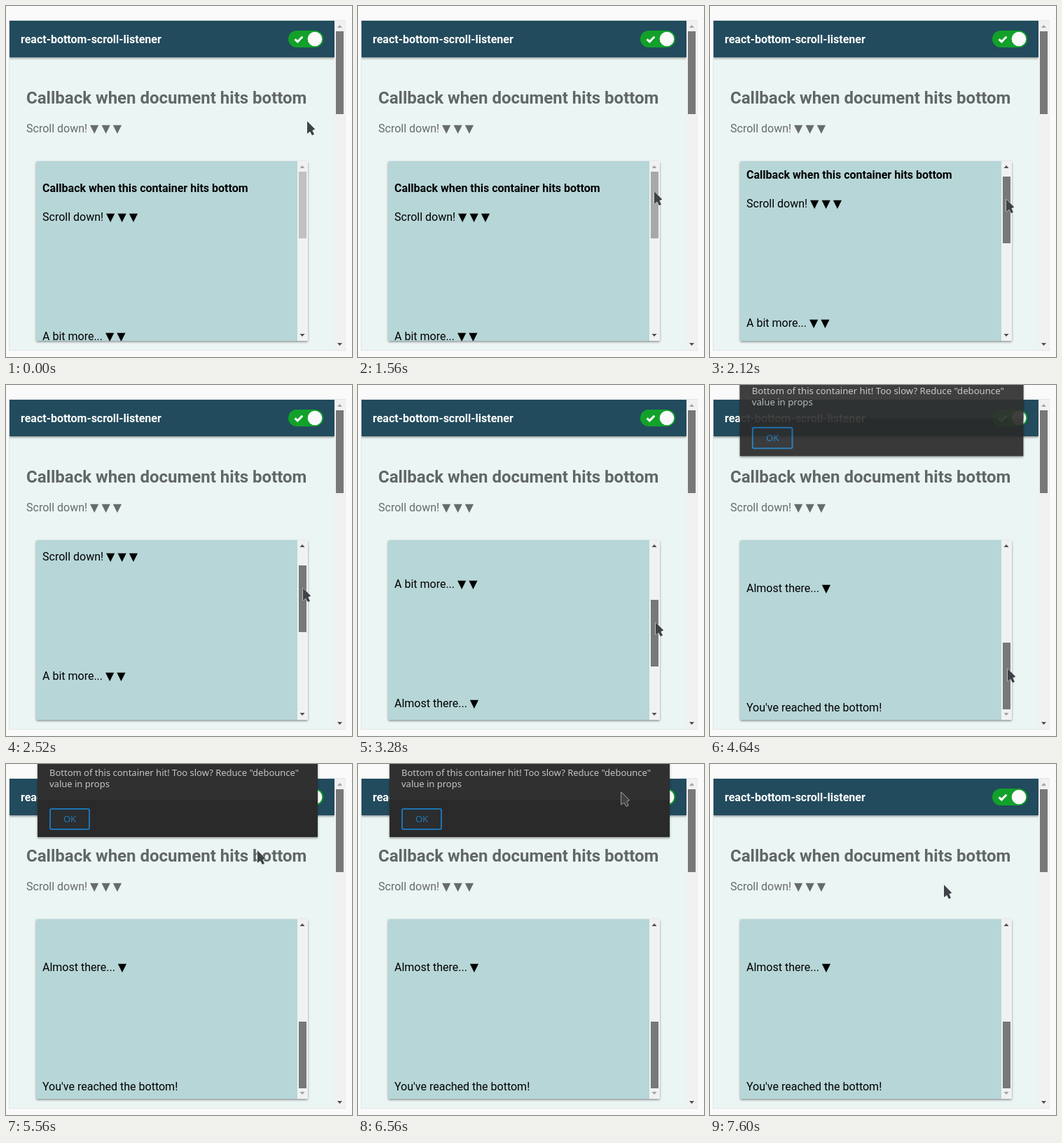
An HTML page that plays this animation: 494 px wide and 500 px high, repeating every 7.64 s.

```html
<!DOCTYPE html>
<html lang="en">
<head>
<meta charset="utf-8">
<title>react-bottom-scroll-listener</title>
<style>
html, body { margin: 0; width: 100%; height: 100%; overflow: hidden; background: #fafafa; }
svg { display: block; width: 494px; height: 500px; }
text { font: 16px Roboto, "DejaVu Sans", sans-serif; white-space: pre; }
.bold { font-weight: 700; }
.title { font-size: 24px; }
.msg { font: 13px "Noto Sans", sans-serif; fill: #c4c4c4; }
</style>
</head>
<body>
<svg viewBox="0 0 494 500" xmlns="http://www.w3.org/2000/svg">
  <defs>
    <filter id="soft" x="-10%" y="-20%" width="120%" height="150%">
      <feDropShadow dx="0" dy="1.5" stdDeviation="1.8" flood-color="#000" flood-opacity=".42"/>
    </filter>
    <clipPath id="view"><rect x="43" y="221" width="373" height="256" rx="2"/></clipPath>
    <clipPath id="app"><rect x="5" y="21" width="464" height="469"/></clipPath>
  </defs>

  <rect width="494" height="500" fill="#fafafa"/>
  <rect x="4.5" y="20.5" width="480" height="470" fill="#ebf5f3" stroke="#dfe7e8"/>

  <g clip-path="url(#app)">
    <rect x="5" y="21" width="464" height="52" fill="#214c5d" filter="url(#soft)"/>
    <text class="bold" x="21" y="53" fill="#fff">react-bottom-scroll-listener</text>
    <rect x="403" y="35" width="50" height="24" rx="12" fill="#12a12a"/>
    <circle cx="441" cy="47" r="10.3" fill="#fafafa"/>
    <path d="M412.5 47.3l3.8 3.6 7-7.2" fill="none" stroke="#fff" stroke-width="3"/>
    <text class="bold title" x="29" y="139" fill="#616667">Callback when document hits bottom</text>
    <text x="29" y="180" fill="#676b6b">Scroll down! ▼ ▼ ▼</text>
  </g>

  <rect x="469" y="21" width="15.5" height="469" fill="#f1f1f1"/>
  <rect x="471" y="36" width="11" height="118" fill="#787878"/>
  <path d="M473 31h7l-3.5-4z" fill="#a3a3a3"/>
  <path d="M473 480h7l-3.5 4z" fill="#505050"/>

  <rect x="43" y="221" width="388" height="256" rx="2" fill="#b7d6d8" filter="url(#soft)"/>
  <g clip-path="url(#view)">
    <g id="list">
      <text class="bold" x="52" y="265">Callback when this container hits bottom</text>
      <text x="52" y="306">Scroll down! ▼ ▼ ▼</text>
      <text x="52" y="476">A bit more... ▼ ▼</text>
      <text x="52" y="646">Almost there... ▼</text>
      <text x="52" y="816">You've reached the bottom!</text>
    </g>
  </g>
  <rect x="416" y="221" width="15" height="256" fill="#f1f1f1"/>
  <rect id="thumb" x="418" y="236" width="11" height="95"/>
  <path id="up" d="M419.5 231h7l-3.5-4z"/>
  <path id="down" d="M419.5 467h7l-3.5 4z"/>

  <g id="dialog">
    <rect x="45" y="-60" width="400" height="164" fill="#2b2b2b" filter="url(#soft)"/>
    <rect x="45" y="-60" width="400" height="111" fill="#303030"/>
    <text class="msg" x="62" y="17">Bottom of this container hit! Too slow? Reduce "debounce"</text>
    <text class="msg" x="62" y="33">value in props</text>
    <rect x="63" y="64" width="56" height="29" rx="2" fill="#2b2d2f" stroke="#1d74b2" stroke-width="2"/>
    <text class="msg" x="91" y="83" text-anchor="middle" style="fill:#2478b3">OK</text>
  </g>

  <path id="cursor" d="M0 0V18L4 14.7 7 20.3 10 18.8 7.4 13.2 11.3 11.6Z"
        fill="#3d4347" stroke="#fff" stroke-width="1" stroke-linejoin="round" paint-order="stroke"/>
</svg>
<script>
const LOOP = 7640, GRAB = 268, TRAVEL = 131, SCROLL = 351;
const $ = id => document.getElementById(id);
const clamp = (v, a = 0, b = 1) => Math.min(b, Math.max(a, v));
const smooth = u => u * u * (3 - 2 * u);
const linear = u => u;

// pointer path: time, x, y, easing towards this point
const path = [
  [0, 430, 164], [700, 430, 164], [1500, 423, 263, smooth], [1560, 423, 264],
  [1800, 423, 264], [1920, 423, 268], [2520, 424, 289], [4000, 425, 384],
  [4280, 425, 404], [5020, 425, 404], [5760, 345, 62, smooth],
  [6100, 230, 52, smooth], [6560, 376, 40, smooth], [7060, 334, 172, smooth], [LOOP, 334, 172]
];

function pointer(t) {
  const i = path.findIndex(p => p[0] > t);
  const a = path[i - 1], b = path[i];
  const u = (b[3] || linear)((t - a[0]) / (b[0] - a[0]));
  return [a[1] + (b[1] - a[1]) * u, a[2] + (b[2] - a[2]) * u];
}

// 0 = hidden, 1 = fully open
function opened(t) {
  const start = t < 7000 ? 4440 : 7200;
  const u = clamp((t - start) / 350);
  return t < 7000 ? 1 - (1 - u) ** 3 : 1 - u ** 2;
}

function draw(t) {
  const [x, y] = pointer(t);
  const drag = t < 1800 ? 0 : t < 4280 ? clamp(y - GRAB, 0, TRAVEL) : TRAVEL;
  const scroll = Math.round(drag * SCROLL / TRAVEL);
  $("cursor").setAttribute("transform", `translate(${Math.round(x)} ${Math.round(y)})`);
  $("list").setAttribute("transform", `translate(0 ${-scroll})`);
  $("thumb").setAttribute("y", 236 + Math.round(drag));
  $("thumb").setAttribute("fill", t < 1520 ? "#c1c1c1" : t < 1800 ? "#a8a8a8" : "#787878");
  $("up").setAttribute("fill", scroll > 0 ? "#505050" : "#a3a3a3");
  $("down").setAttribute("fill", scroll < SCROLL ? "#505050" : "#a3a3a3");

  const open = opened(t), rest = 1 - open;
  $("dialog").setAttribute("opacity", open);
  $("dialog").setAttribute("transform",
    `translate(245 ${-50 * rest}) scale(${1 + .15 * rest}) translate(-245 0)`);
}

function tick() {
  draw(Math.floor(performance.now() % LOOP / 40) * 40);
  requestAnimationFrame(tick);
}
tick();
</script>
</body>
</html>
```
